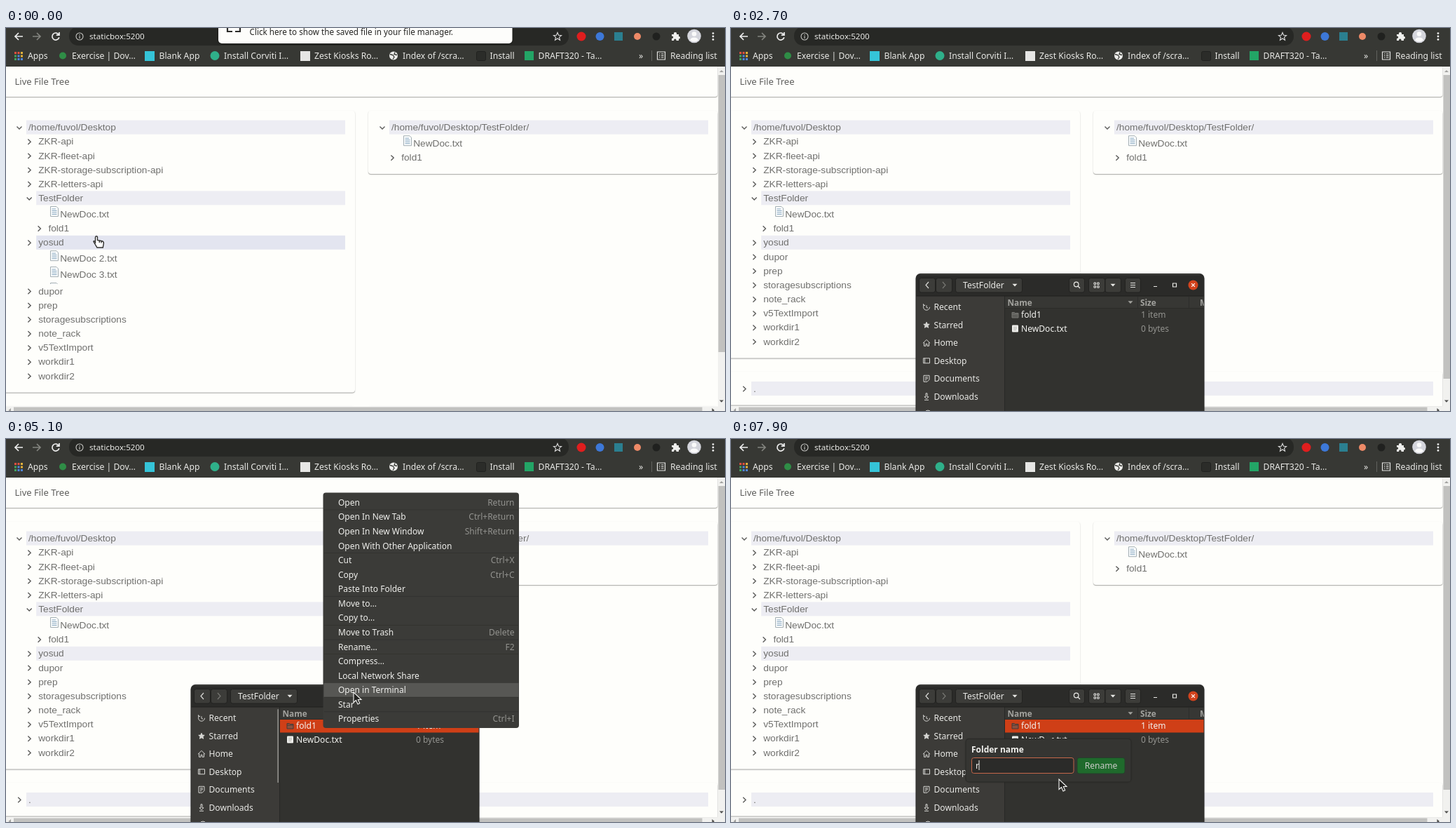
An HTML page with a canvas that plays this animation: 1026 px wide and 546 px high, repeating every 8 s.

```html
<!DOCTYPE html>
<html lang="en">
<head>
<meta charset="utf-8">
<title>File tree</title>
<style>
html, body { margin: 0; width: 100%; height: 100%; overflow: hidden; background: #fefefb; }
canvas { display: block; width: 1026px; height: 546px; }
</style>
</head>
<body>
<canvas id="stage" width="1026" height="546"></canvas>
<script>
const c = document.getElementById('stage').getContext('2d');
const LOOP = 8000;
const UI = '"Noto Sans", "Open Sans", sans-serif';
const TREE = '"Liberation Sans", Arial, sans-serif';
const PAGE = '#fefefb', BAR = '#373834', PALE = '#e9e9e6', ORANGE = '#cf3f17';

// ---------- helpers ----------
function rect(x, y, w, h, fill) { c.fillStyle = fill; c.fillRect(x, y, w, h); }

function round(x, y, w, h, r, fill, stroke) {
  c.beginPath();
  c.roundRect(x, y, w, h, r);
  if (fill) { c.fillStyle = fill; c.fill(); }
  if (stroke) { c.strokeStyle = stroke; c.lineWidth = 1; c.stroke(); }
}

function raised(x, y, w, h, r, fill, alpha, blur, drop = 0) {
  c.save();
  c.shadowColor = `rgba(0,0,0,${alpha})`;
  c.shadowBlur = blur;
  c.shadowOffsetY = drop;
  round(x, y, w, h, r, fill);
  c.restore();
}

function disc(x, y, r, fill) {
  c.beginPath();
  c.arc(x, y, r, 0, 7);
  c.fillStyle = fill;
  c.fill();
}

function path(d, stroke, width = 1.3, fill, x = 0, y = 0) {
  c.save();
  c.translate(x, y);
  const p = new Path2D(d);
  if (fill) { c.fillStyle = fill; c.fill(p); }
  if (stroke) { c.strokeStyle = stroke; c.lineWidth = width; c.stroke(p); }
  c.restore();
}

function text(s, x, y, color = PALE, size = 12, font = UI, align = 'left', weight = 400) {
  c.font = `${weight} ${size}px ${font}`;
  c.textAlign = align;
  c.fillStyle = color;
  c.fillText(s, x, y);
}

const triDown = (x, y, color, r = 3.5) => path(`M${-r} ${-r / 2}H${r}L0 ${r / 2 + .3}Z`, null, 0, color, x, y);
const triUp = (x, y, color, r = 3) => path(`M${-r} ${r / 2}H${r}L0 ${-r / 2}Z`, null, 0, color, x, y);

// ---------- pointer ----------
// time, x, y, kind: a = arrow (tip), h = hand (centre), '' = hidden
const moves = [
  [0, 132, 305, 'h'], [200, 72, 289, 'h'], [700, 300, 305, 'h'], [800, 449, 316, 'h'],
  [1100, 62, 350, 'h'], [1200, 497, 410, 'a'], [1500, 55, 411, 'h'], [1600, 96, 434, 'h'],
  [1900, 17, 362, 'a'], [2100, 3, 313, 'a'], [2200, 0, 0, ''],
  [2800, 6, 256, 'a'], [2900, 150, 310, 'a'], [3000, 330, 375, 'a'], [3100, 440, 415, 'a'], [3200, 490, 428, 'a'],
  [3500, 480, 424, 'a'], [3600, 464, 416, 'a'], [3700, 452, 411, 'a'],
  [4800, 462, 440, 'a'], [4900, 482, 468, 'a'], [5000, 492, 405, 'a'], [5100, 496, 361, 'a'],
  [5200, 497, 348, 'a'], [5300, 498, 333, 'a'], [5400, 499, 318, 'a'], [5500, 500, 305, 'a'], [5600, 500, 294, 'a'],
  [6100, 492, 350, 'a'], [6200, 478, 440, 'a'], [6300, 468, 485, 'a']
];

function pointerAt(t) {
  const [, x, y, kind] = moves.findLast(m => m[0] <= t);
  return { x, y, kind };
}

function drawPointer({ x, y, kind }) {
  if (kind === 'a') path('M0 0V14.5L3.5 11.5L6 17L8.7 15.8L6.3 10.5H11Z', '#f4f4f2', 1.1, '#20201e', x, y);
  if (kind === 'h') path('M-4.5 2V-6.5Q-4.5-8.3-3-8.3T-1.5-6.5V-2.5L5-1.3Q7.6-.7 7.4 2L6.3 8H-2L-7-.5Q-6.8-2.6-4.5 0ZM1.3-2V1M4-1.4V1.4', '#30302e', 1.4, '#fff', x, y);
}

// ---------- browser bars ----------
function drawBrowser() {
  rect(0, 0, 1026, 55, BAR);
  round(90, -2, 713, 27, 13, '#272825');
  path('M6 0H-5M0-5L-5 0L0 5', '#eee', 1.7, null, 18, 12);
  path('M-6 0H5M0-5L5 0L0 5', '#83847f', 1.7, null, 44, 12);
  path('M4.2-2.6A5 5 0 1 0 4.8 1.2M5-6V-1.8H.8', '#eee', 1.7, null, 71, 12);
  path('M5 0A5 5 0 1 1-5 0A5 5 0 1 1 5 0M0-.8V3M0-3V-1.8', '#c9c9c6', 1.1, null, 105, 12);
  text('staticbox:5200', 119, 16, PALE, 11.6);
  path('M0-5.5L1.6-1.7L5.6-1.4L2.5 1.2L3.5 5.2L0 3L-3.5 5.2L-2.5 1.2L-5.6-1.4L-1.6-1.7Z', '#ddd', 1.1, null, 787, 12);

  disc(821, 12, 6.5, '#e01e1e');
  disc(847.5, 12, 6, '#3d78d8');
  rect(868, 6, 12, 12, '#2b7f90');
  disc(901, 12, 5, '#ee8a67');
  disc(928, 12, 5.5, '#20211f');
  path('M-5-3H-2Q-2.6-6 0-6T2-3H5V0Q7-.4 7 1.7T5 3.6V6H1.6Q1.6 3.6-.2 3.6T-2 6H-5V3Q-2.8 3-2.8 1.2T-5-.4Z', null, 0, '#f0f0ee', 955, 12);
  disc(982, 11.5, 9.8, '#d4d5dc');
  disc(982, 8.5, 3.3, '#fafafa');
  path('M-6 6Q-5 2 0 2T6 6Q0 10-6 6Z', null, 0, '#fafafa', 982, 11.5);
  for (let i = -1; i < 2; i++) disc(1009, 12 + i * 4.4, 1.4, '#eee');

  const hues = ['#e2513f', '#e2513f', '#e5b13a', '#43a35c', '#4f86dc', '#e5b13a', '#43a35c', '#4f86dc', '#4f86dc'];
  hues.forEach((h, i) => rect(12 + i % 3 * 4.5, 34 + Math.floor(i / 3) * 4.5, 3, 3, h));
  disc(81, 39.5, 5, '#2f8d46');
  rect(198, 33, 14, 14, '#35c4d8');
  disc(298, 39.5, 6.5, '#2fb08a');
  rect(420, 33, 14, 14, '#e6e6e4');
  disc(553, 39.5, 6, '#ececea');
  path('M-5-2L-1-1L1 2L-1 5M2-5L1-2L5-1', BAR, 1.3, null, 553, 39.5);
  round(671.5, 33.5, 13, 13, 2, '#2b2c29', '#20211f');
  rect(740, 33, 13, 13, '#23a566');
  [['Apps', 31], ['Exercise | Dov…', 94], ['Blank App', 218.5], ['Install Corviti I…', 311],
   ['Zest Kiosks Ro…', 440], ['Index of /scra…', 566], ['Install', 690.5], ['DRAFT320 - Ta…', 759.5],
   ['»', 903], ['Reading list', 948]].forEach(([s, x]) => text(s, x, 44, PALE, 12.2));
  rect(921, 32, 1, 15, '#62635f');
  path('M-5.5-5.5H5.5V5.5H-5.5ZM-3-2.5H-1.6M0-2.5H3.5M-3 0H-1.6M0 0H3.5M-3 2.5H-1.6M0 2.5H3.5', '#e4e4e2', 1.2, null, 935, 39.5);
}

function drawToast(t) {
  if (t >= 200) return;
  c.save();
  if (t >= 100) { c.globalAlpha = .5; c.translate(0, -13); }
  raised(303, -20, 419.5, 42, 5, '#fdfdfb', .5, 3);
  path('M316 0V5H323M327 5H334V0', '#2c2c2a', 2.2);
  text('Click here to show the saved file in your file manager.', 347.5, 9.5, '#262624', 11.7);
  c.restore();
}

// ---------- page ----------
function card(x, y, w, h) {
  raised(x, y + 1, w, h, 4, '#b4b4b1', .22, 2);
  round(x, y, w, h, 4, PAGE);
}

function folder(name, depth, x, y, right, pointer, open, fill) {
  const left = x + depth * 14.2;
  if (pointer.kind === 'h' && !fill) {
    const hx = pointer.x - 3, hy = pointer.y - 8;
    if (hx > left - 3 && hx < right && Math.abs(hy - y) < 10) fill = '#f1f1f0';
  }
  if (fill) rect(left - 3, y - 10, right - left + 3, 20, fill);
  path(open ? 'M-3.5-1.5L0 2L3.5-1.5' : 'M-1.8-3.7L2 0L-1.8 3.7', '#5c5c5a', 1.4, null, left - 13, y + .5);
  text(name, left, y + 4.6, '#70706e', 13.7, TREE);
}

function file(name, x, y) {
  path('M.5.5H9L11.5 3V14.5H.5Z', '#a3aeb3', 1, '#fbfdfd', x, y - 11);
  path('M2.5 4H8M2.5 6.5H9.5M2.5 9H9.5M2.5 11.5H9.5', '#82a3bd', 1, null, x, y - 11);
  text(name, x + 14.2, y + 4.6, '#70706e', 13.7, TREE);
}

function drawPage(t, pointer) {
  const shift = t < 100 ? 49 : t < 200 ? 14 : 0;
  const tint = '#ededf3';
  c.save();
  c.beginPath();
  c.rect(0, 55, 1016, 484.5);
  c.clip();
  rect(0, 55, 1026, 491, PAGE);
  card(-5, 40, 1020.5, 58);
  text('Live File Tree', 12.5, 81, '#5f5f5d', 13);

  card(-5, 118, 503, 352.5 + shift);
  folder('/home/fuvol/Desktop', 0, 32, 141.5, 484, pointer, true, tint);
  ['ZKR-api', 'ZKR-fleet-api', 'ZKR-storage-subscription-api', 'ZKR-letters-api']
    .forEach((s, i) => folder(s, 1, 32, 161.7 + i * 20.2, 484, pointer));
  folder('TestFolder', 1, 32, 242.4, 484, pointer, true, tint);
  file('NewDoc.txt', 63, 265);
  folder('fold1', 2, 32, 285.5, 484, pointer);
  folder('yosud', 1, 32, 305.8, 484, pointer, false, t < 2500 ? '#e3e5f0' : tint);
  if (shift) {
    c.save();
    c.beginPath();
    c.rect(0, 316, 490, shift);
    c.clip();
    for (let i = 0; i < 3; i++) file(`NewDoc ${i + 2}.txt`, 63, 328.2 + i * 22.9);
    c.restore();
  }
  ['dupor', 'prep', 'storagesubscriptions', 'note_rack', 'v5TextImport', 'workdir1', 'workdir2']
    .forEach((s, i) => folder(s, 1, 32, 326 + shift + i * 20.15, 484, pointer));

  card(517, 118, 498.5, 90);
  folder('/home/fuvol/Desktop/TestFolder/', 0, 550, 141.5, 1002, pointer, true, tint);
  file('NewDoc.txt', 567, 164.2);
  folder('fold1', 1, 550, 184.6, 1002, pointer);

  card(-5, 490 + shift, 503, 47.5);
  folder('.', 0, 32, 514 + shift, 484, pointer, false, tint);
  card(517, 490 + shift, 498.5, 80);
  folder('/home', 0, 550, 514 + shift, 1002, pointer, true, tint);
  folder('fuvol', 1, 550, 534.3 + shift, 1002, pointer);
  c.restore();

  rect(1016, 55, 10, 491, '#f1f1ef');
  rect(0, 539.5, 1026, 6.5, '#f1f1ef');
  rect(1016.5, 67, 9.5, 433 - 38 * shift / 49, '#c1c1bf');
  rect(11, 540.5, 982.5, 5.5, '#c1c1bf');
  triUp(1021, 61.5, '#a2a2a0');
  triDown(1021, 532, '#4f4f4d', 3);
  path('M2-3V3L-1.5 0Z', null, 0, '#a2a2a0', 5, 545);
  path('M-1.5-3V3L2 0Z', null, 0, '#4f4f4d', 1009, 545);
}

// ---------- file manager ----------
const places = [
  ['Recent', 'M4.5 0A4.5 4.5 0 1 1-3.2-3.2M-4.5-4.5V-2.4H-2M0-2.5V.5L2 1.5'],
  ['Starred', 'M0-4L1.2-1.2L4.2-1L1.9 1L2.6 4L0 2.4L-2.6 4L-1.9 1L-4.2-1L-1.2-1.2Z'],
  ['Home', 'M-5 .5L0-4.5L5 .5M-3.5-.5V4.5H-1V1.5H1V4.5H3.5V-.5'],
  ['Desktop', 'M-4.5-3.5H4.5V3.5H-4.5ZM-2.5-3.5V3.5'],
  ['Documents', 'M-4-4.5H4V1.5L1 4.5H-4ZM-2-2H2M-2 0H2M-2 2H0'],
  ['Downloads', 'M-1-4.5H1V.5H3L0 3.5L-3 .5H-1ZM-3 5H3']
];

function button(x, w) { round(x + .5, 356.5, w - 1, 20.5, 3, '#3c3c39', '#222220'); }

function drawWindow(t) {
  if (t < 2500) return;
  c.save();
  if (t < 2700) {
    const k = t < 2600 ? .9 : .98;
    c.globalAlpha = t < 2600 ? .35 : .85;
    c.translate(470, 480);
    c.scale(k, k);
    c.translate(-470, -480);
  }
  raised(263.5, 350, 412, 215, [7, 7, 0, 0], '#2a2a28', .2, 2);
  round(264.5, 351, 410, 31, [6, 6, 0, 0], '#2b2b29');
  path('M270 351.5H669', '#454542', 1);

  [[268, 24], [292, 24], [320, 96], [482, 23], [510, 24], [533.5, 23.5], [562, 23]].forEach(b => button(...b));
  path('M2-4.5L-2 0L2 4.5', '#d9d9d6', 1.2, null, 280, 366.5);
  path('M-2-4.5L2 0L-2 4.5', '#787874', 1.2, null, 304, 366.5);
  text('TestFolder', 331, 371, PALE, 12.1);
  triDown(405, 366.5, PALE);
  path('M2.5-1A3.3 3.3 0 1 1-4.1-1A3.3 3.3 0 1 1 2.5-1M1.6 1.5L4.5 4.5', PALE, 1.2, null, 493.5, 366.5);
  for (let i = 0; i < 4; i++) path('M.5.5H3V3H.5Z', PALE, 1, null, 517.5 + i % 2 * 4.7, 362.5 + (i >> 1) * 4.7);
  triDown(545, 366.5, PALE);
  path('M-3.5-3H3.5M-3.5 0H3.5M-3.5 3H3.5', PALE, 1.1, null, 573.5, 366.5);
  path('M603 368.5H608M630.5 364H635.5V369H630.5Z', PALE, 1.2);
  disc(659.5, 366.5, 7, '#d2431d');
  path('M-2.4-2.4L2.4 2.4M2.4-2.4L-2.4 2.4', '#fff', 1.2, null, 659.5, 366.5);

  rect(264.5, 382, 126, 164, '#3c3b38');
  rect(390, 382, 1, 164, '#282826');
  rect(391, 382, 283.5, 164, '#32322f');
  rect(391, 382.5, 283.5, 16.5, '#373734');
  rect(264.5, 381.5, 410, 1, '#20201e');
  rect(391, 399, 283.5, .7, '#2a2a28');
  rect(580, 383, 1, 16, '#2d2d2b');
  rect(653, 383, 1, 16, '#2d2d2b');
  places.forEach(([name, icon], i) => {
    const y = 397.8 + i * 25.5;
    path(icon, '#d5d5d2', 1, name === 'Starred' ? '#d5d5d2' : null, 279, y);
    text(name, 289.5, y + 4.4, PALE, 12.1);
  });
  path('M-4 5A4 4 0 0 1 4 5', '#d5d5d2', 1, null, 281, 544);
  if (t >= 3000 && t < 5500) round(387.3, 385, 1.7, 105, 1, '#8b8b87');

  text('Name', 394.5, 395.5, '#a2a29e', 11.8, UI, 'left', 700);
  text('Size', 584, 395.5, '#a2a29e', 11.8, UI, 'left', 700);
  c.save();
  c.beginPath();
  c.rect(660, 383, 14.5, 16);
  c.clip();
  text('M', 669, 395.5, '#a2a29e', 11.8, UI, 'left', 700);
  c.restore();
  triDown(570, 391, '#a2a29e');

  const picked = t >= 3900;
  if (picked) rect(391, 400, 283.5, 18.5, ORANGE);
  path('M.5 1.5H4L5 2.5H9.5V9H.5ZM.5 4H9.5', picked ? '#443a36' : '#777773', 1, picked ? '#8c5140' : '#5d5d59', 400.5, 404);
  text('fold1', 414, 413.3, '#f3f3f0', 12.1);
  text('1 item', 585, 413.3, picked ? '#f3f3f0' : '#93938f', 12);
  round(401, 423.5, 9, 10, 1, '#efefec');
  path('M403 426.5H408M403 428.5H408M403 430.5H407', '#a8a8a4', .8);
  text('NewDoc.txt', 414, 433, '#f3f3f0', 12.1);
  text('0 bytes', 585, 433, '#93938f', 12);
  c.restore();
}

// ---------- context menu ----------
const items = [
  ['Open', 'Return'], ['Open In New Tab', 'Ctrl+Return'], ['Open In New Window', 'Shift+Return'],
  ['Open With Other Application'], ['Cut', 'Ctrl+X'], ['Copy', 'Ctrl+C'], ['Paste Into Folder'],
  ['Move to…'], ['Copy to…'], ['Move to Trash', 'Delete'], ['Rename…', 'F2'], ['Compress…'],
  ['Local Network Share'], ['Open in Terminal'], ['Star'], ['Properties', 'Ctrl+I']
];

function drawMenu(t, pointer) {
  if (t < 4500 || t >= 6000) return;
  round(452.5, 76.5, 279.5, 335.5, 4, '#3b3b38');
  items.forEach(([name, key], i) => {
    const y = 90.6 + i * 20.56;
    if (t >= 5000 && Math.abs(pointer.y - y) < 10.28) rect(453.5, y - 10, 278, 20, '#575754');
    if ([1, 4, 7, 9, 10, 11, 14, 15].includes(i)) rect(454, y - 10.6, 277, .8, '#31312e');
    text(name, 474, y + 4.3, '#efefec', 12);
    if (key) text(key, 725.5, y + 4.3, '#93938f', 12, UI, 'right');
  });
}

// ---------- rename popover ----------
function drawRename(t) {
  if (t < 6000) return;
  const step = Math.min(2, (t - 6000) / 100);
  c.save();
  c.globalAlpha = [.53, .85, 1][step];
  c.translate(0, step * 3 - 6);
  raised(334.5, 427, 237, 62.5, 5, '#292927', .15, 2);
  round(335.5, 428, 235, 60.5, 4, '#353532');
  path('M445 428.5L452.5 420.5L460 428.5Z', null, 0, '#353532');
  text('Folder name', 343, 447, '#f0f0ed', 12, UI, 'left', 700);
  round(343.5, 454.5, 145.5, 22, 3, '#2b2b29', '#c4674a');

  if (t < 7400) {
    rect(348.5, 457.5, 31, 15.5, '#d24c2c');
    text('fold1', 349, 469.5, '#fff', 12.1);
  } else {
    const typed = t >= 7800;
    if (typed) text('r', 349, 469.5, '#f0f0ed', 12.1);
    rect(typed ? 353.5 : 349, 458, 1, 14, '#f0f0ed');
  }

  let live = 1;
  if (t >= 7400) live = Math.max(0, 1 - (t - 7300) / 300);
  if (t >= 7800) live = t < 7900 ? .3 : .6;
  const mix = (a, b) => Math.round(a + (b - a) * live);
  round(494, 454.5, 68, 22.5, 3, `rgb(${mix(46, 21)},${mix(68, 132)},${mix(47, 42)})`, '#24402a');
  const grey = mix(150, 238);
  text('Rename', 528, 470, `rgb(${grey},${grey},${grey - 3})`, 12.1, UI, 'center');
  c.restore();
}

function draw(now) {
  const t = Math.floor(now % LOOP / 100) * 100;
  const pointer = pointerAt(t);
  c.clearRect(0, 0, 1026, 546);
  drawPage(t, pointer);
  drawBrowser();
  drawToast(t);
  drawWindow(t);
  drawMenu(t, pointer);
  drawRename(t);
  drawPointer(pointer);
}

let start;
function tick(now) {
  start ??= now;
  draw(Math.max(0, now - start));
  requestAnimationFrame(tick);
}
draw(0);
requestAnimationFrame(tick);
</script>
</body>
</html>
```
